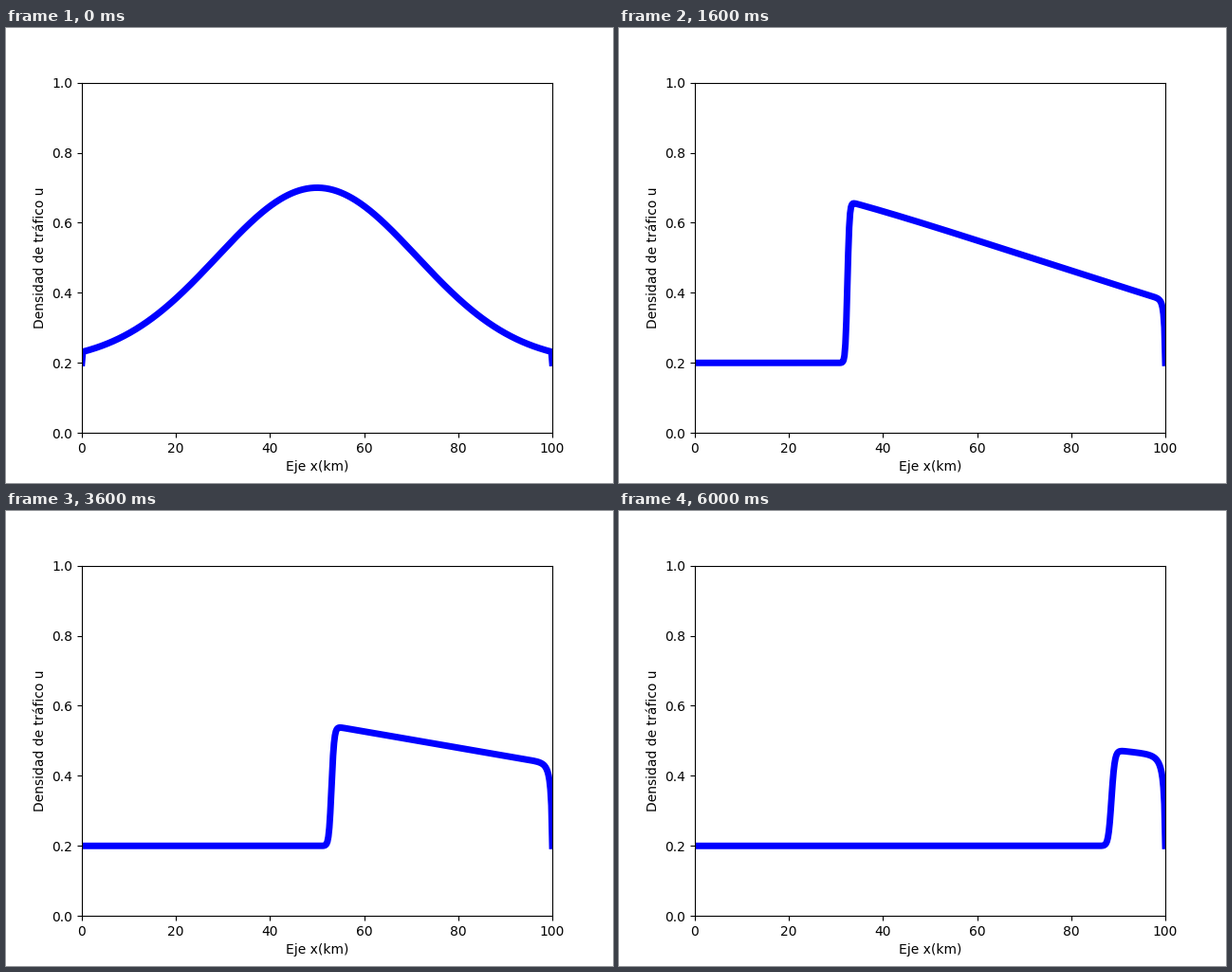
These frames come from a looping animation (640 px wide and 480 px high, 6.1 s). A matplotlib script:

```python
import numpy as np
import matplotlib.pyplot as plt
from matplotlib.animation import FuncAnimation

FRAMES = 61
INTERVAL = 100        # ms
LENGTH = 100.0        # km
CELLS = 500
SUBSTEPS = 40         # solver steps per frame
SPEED = 5.0           # free-flow speed, km per frame
VISCOSITY = 0.5       # km^2 per frame
EDGE = 0.2            # density held at both ends

x = np.linspace(0, LENGTH, CELLS + 1)
dx = x[1] - x[0]
dt = 1 / SUBSTEPS


def start_profile():
    u = EDGE + 0.5 * np.exp(-((x - 50) / 30) ** 2)
    u[0] = u[-1] = EDGE
    return u


def step(u):
    """Advance u_t + (V u (1 - u))_x = nu u_xx by one time step."""
    flux = SPEED * u * (1 - u)
    new = u.copy()
    new[1:-1] += dt * (
        VISCOSITY * (u[2:] - 2 * u[1:-1] + u[:-2]) / dx**2
        - (flux[2:] - flux[:-2]) / (2 * dx)
    )
    return new


def solve():
    u = start_profile()
    profiles = [u]
    for _ in range(FRAMES - 1):
        for _ in range(SUBSTEPS):
            u = step(u)
        profiles.append(u)
    return profiles


profiles = solve()

fig, ax = plt.subplots(figsize=(6.4, 4.8), dpi=100)
ax.set_xlim(0, LENGTH)
ax.set_ylim(0, 1)
ax.set_xlabel("Eje x(km)")
ax.set_ylabel("Densidad de tráfico u")
line, = ax.plot(x, profiles[0], color="blue", lw=5)


def update(i):
    line.set_ydata(profiles[i])
    return line,


anim = FuncAnimation(fig, update, frames=FRAMES, interval=INTERVAL,
                     repeat=True, repeat_delay=0)
plt.show()
```
